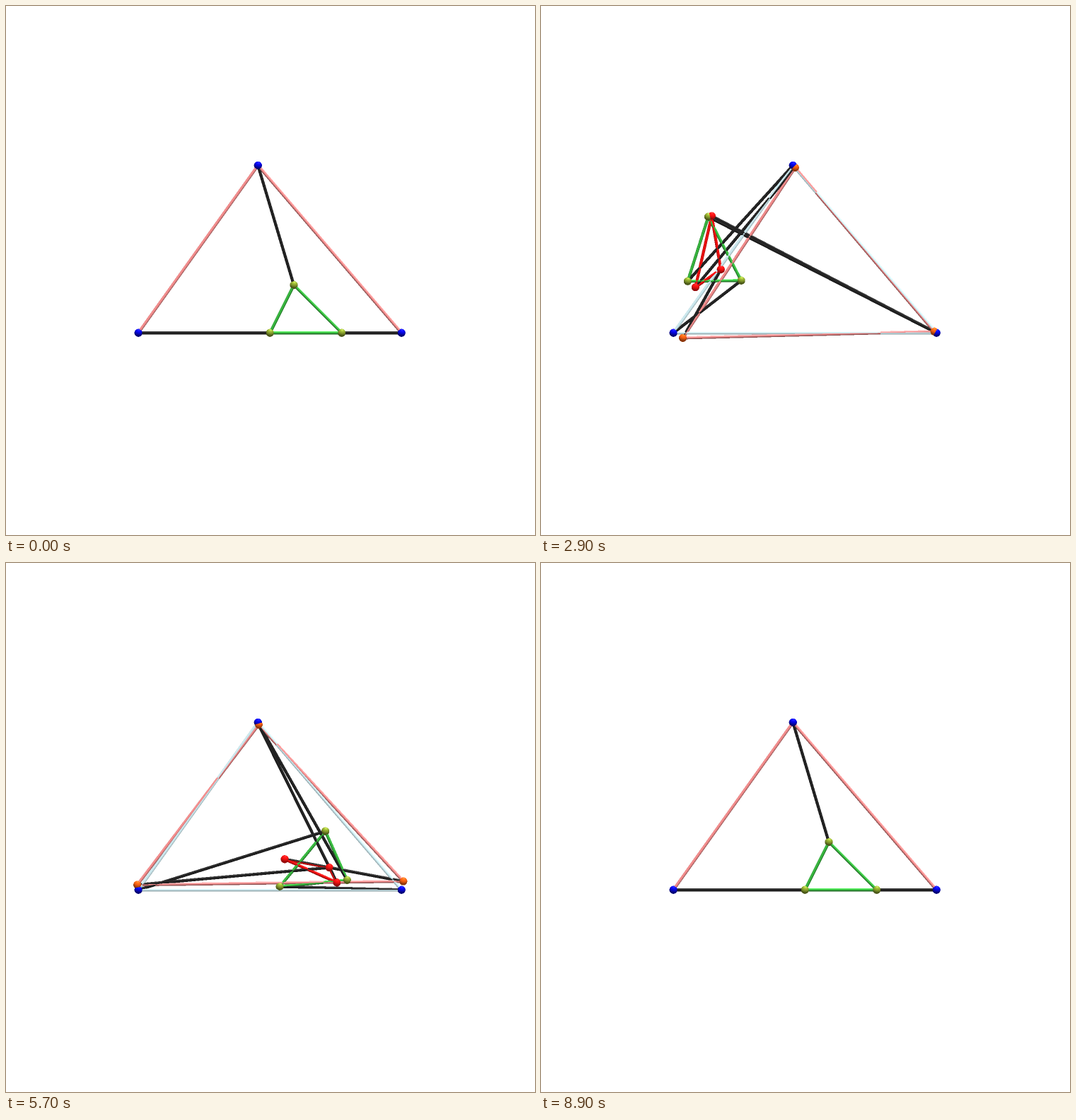
Write an HTML page with a canvas that moves like this. It is 748 px wide and 748 px high and loops after 9000 ms.

```html
<!DOCTYPE html>
<html lang="en">
<head>
<meta charset="utf-8">
<title>Planar manipulator and its closest singular pose</title>
<style>
html, body { margin: 0; width: 100%; height: 100%; overflow: hidden; background: #fff; }
canvas { display: block; }
</style>
</head>
<body>
<canvas id="stage" width="748" height="748"></canvas>
<script>
const SIZE = 748, FINE = 2, GRID = SIZE * FINE;
const UNIT = 33.82, ORIGIN = [187.2, 462.2];
const STEPS = 90, STEP_MS = 100;
const BASE = [[0, 0], [11, 0], [5, 7]];
const PLATFORM = [[0, 0], [3, 0], [1, 2]];
const LIGHT = [0.15, -0.76, 0.63];

// red, green, blue, ambient share
const BLUE = [8, 8, 235, 0.5], ORANGE = [255, 100, 20, 0.55];
const OLIVE = [150, 176, 50, 0.5], RED = [250, 18, 18, 0.6];
const GREEN = [60, 195, 68, 0.55], BLACK = [36, 36, 36, 0.7];
const PINK = [255, 148, 148, 0.55], PALE = [200, 228, 234, 0.75];

const ctx = document.getElementById("stage").getContext("2d");
const fine = document.createElement("canvas");
fine.width = fine.height = GRID;
const fineCtx = fine.getContext("2d");
const image = fineCtx.createImageData(GRID, GRID);
const depth = new Float32Array(GRID * GRID);

const cross = (a, b) => [
  a[1] * b[2] - a[2] * b[1],
  a[2] * b[0] - a[0] * b[2],
  a[0] * b[1] - a[1] * b[0]
];

// Six joints: three on the base, three on the moving platform.
function pose(angle) {
  const c = Math.cos(angle), s = Math.sin(angle);
  const moved = PLATFORM.map(([x, y]) => [
    5.5 - 3 * s + c * x - s * y,
    1.5 * (1 - c) + s * x + c * y
  ]);
  return [...BASE, ...moved];
}

// Singular when the three leg lines meet: determinant of line coordinates.
function singularity(q) {
  const rows = [0, 1, 2].map(i => {
    const [ax, ay] = q[i], [px, py] = q[i + 3];
    return [px - ax, py - ay, ax * py - ay * px];
  });
  const grad = [];
  let value = 0;
  for (let i = 0; i < 3; i++) {
    const m = cross(rows[(i + 1) % 3], rows[(i + 2) % 3]);
    const [ax, ay] = q[i], [px, py] = q[i + 3];
    if (!i) value = rows[0][0] * m[0] + rows[0][1] * m[1] + rows[0][2] * m[2];
    grad[i] = [py * m[2] - m[0], -m[1] - px * m[2]];
    grad[i + 3] = [m[0] - ay * m[2], m[1] + ax * m[2]];
  }
  return { value, grad };
}

// Inverse of the metric that averages squared displacement along all nine bars.
function invertMetric(g) {
  const out = g.map(() => [0, 0]);
  for (let k = 0; k < 2; k++) {
    let sum = 0, diff = 0;
    for (let i = 0; i < 3; i++) {
      sum += g[i][k] + g[i + 3][k];
      diff += g[i][k] - g[i + 3][k];
    }
    for (let i = 0; i < 3; i++) {
      const s = (g[i][k] + g[i + 3][k] - sum / 9) / 6;
      const d = (g[i][k] - g[i + 3][k] - diff / 7) / 4;
      out[i][k] = (s + d) / 2;
      out[i + 3][k] = (s - d) / 2;
    }
  }
  return out;
}

// Damped projection onto the singular set from one starting displacement.
function project(home, d) {
  let cost = Infinity, error = Infinity;
  for (let n = 0; n < 300 && !(error < 1e-10); n++) {
    const q = home.map((p, i) => [p[0] + d[i][0], p[1] + d[i][1]]);
    const { value, grad } = singularity(q);
    const h = invertMetric(grad);
    let gd = 0, gh = 0;
    for (let i = 0; i < 6; i++) for (let k = 0; k < 2; k++) {
      gd += grad[i][k] * d[i][k];
      gh += grad[i][k] * h[i][k];
    }
    const mu = (gd - value) / gh;
    error = 0;
    for (let i = 0; i < 6; i++) for (let k = 0; k < 2; k++) {
      const e = mu * h[i][k] - d[i][k];
      error += e * e;
      d[i][k] += 0.3 * e;
    }
    cost = mu * mu * gh;
  }
  return { d, cost: error < 1e-4 ? cost : Infinity };
}

function closestSingular(home) {
  let seed = 7;
  const random = () => (seed = seed * 16807 % 2147483647) / 2147483647;
  let best = { cost: Infinity, d: home.map(() => [0, 0]) };
  for (let n = 0; n < 36; n++) {
    const spread = n ? 3 : 0;
    const start = home.map(() => [spread * (random() - 0.5), spread * (random() - 0.5)]);
    const found = project(home, start);
    if (found.cost < best.cost - 1e-7) best = found;
  }
  return home.map((p, i) => [p[0] + best.d[i][0], p[1] + best.d[i][1]]);
}

const toGrid = ([x, y]) => [FINE * (ORIGIN[0] + x * UNIT), FINE * (ORIGIN[1] - y * UNIT)];

function plot(x, y, z, nx, ny, nz, color) {
  const at = y * GRID + x;
  if (z <= depth[at] + 1e-4) return;
  depth[at] = z;
  const lit = Math.max(0, nx * LIGHT[0] + ny * LIGHT[1] + nz * LIGHT[2]);
  const shade = color[3] + (1.15 - color[3]) * lit;
  const gloss = 40 * lit ** 14;
  for (let k = 0; k < 3; k++) image.data[at * 4 + k] = color[k] * shade + gloss;
}

// A rod with equal ends is a ball.
function rod(a, b, radius, color) {
  const r = radius * FINE;
  const dx = b[0] - a[0], dy = b[1] - a[1], len2 = dx * dx + dy * dy;
  const x0 = Math.floor(Math.min(a[0], b[0]) - r), x1 = Math.ceil(Math.max(a[0], b[0]) + r);
  const y0 = Math.floor(Math.min(a[1], b[1]) - r), y1 = Math.ceil(Math.max(a[1], b[1]) + r);
  for (let y = y0; y <= y1; y++) for (let x = x0; x <= x1; x++) {
    const px = x + 0.5 - a[0], py = y + 0.5 - a[1];
    const t = len2 ? (px * dx + py * dy) / len2 : 0;
    if (t < 0 || t > 1) continue;
    const ex = px - t * dx, ey = py - t * dy;
    const z2 = r * r - ex * ex - ey * ey;
    if (z2 <= 0) continue;
    const z = Math.sqrt(z2);
    plot(x, y, z, ex / r, ey / r, z / r, color);
  }
}

const balls = (points, color) => points.forEach(p => rod(p, p, 5.6, color));
const triangle = (points, color) =>
  points.forEach((p, i) => rod(p, points[(i + 1) % 3], 2.1, color));
const legs = q => [0, 1, 2].forEach(i => rod(q[i], q[i + 3], 2.1, BLACK));

function draw(step) {
  const home = pose(2 * Math.PI * step / (STEPS - 1));
  const given = home.map(toGrid);
  const singular = closestSingular(home).map(toGrid);
  image.data.fill(255);
  depth.fill(0);
  balls(given.slice(0, 3), BLUE);
  balls(given.slice(3), OLIVE);
  balls(singular.slice(0, 3), ORANGE);
  balls(singular.slice(3), RED);
  triangle(given.slice(3), GREEN);
  triangle(singular.slice(3), RED);
  legs(given);
  legs(singular);
  triangle(singular.slice(0, 3), PINK);
  triangle(given.slice(0, 3), PALE);
  fineCtx.putImageData(image, 0, 0);
  ctx.drawImage(fine, 0, 0, SIZE, SIZE);
}

let shown = -1;
function tick() {
  const step = Math.floor(performance.now() / STEP_MS) % STEPS;
  if (step !== shown) draw(shown = step);
  requestAnimationFrame(tick);
}
tick();
</script>
</body>
</html>
```
